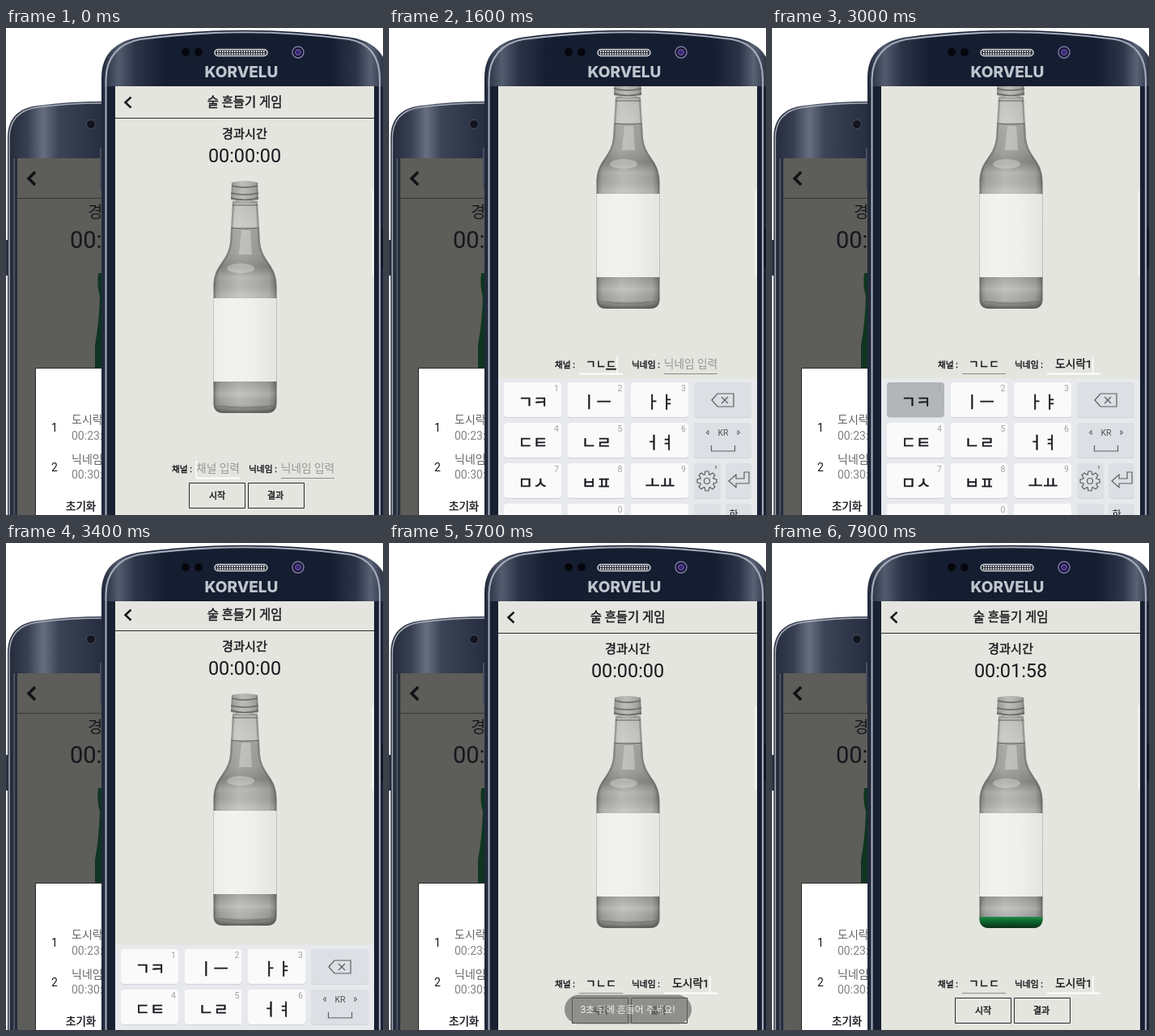
An HTML page that plays this animation: 466 px wide and 602 px high, repeating every 8000 ms.

```html
<!DOCTYPE html>
<html lang="ko">
<head>
<meta charset="utf-8">
<style>
html, body { margin: 0; width: 100%; height: 100%; overflow: hidden; background: #fff }
svg { display: block }
text { font-family: Roboto, "Noto Sans CJK KR", "Noto Sans CJK", sans-serif; fill: #16181d }
.mid { text-anchor: middle }
.med { stroke: #16181d; stroke-width: .4px }
.hint { fill: #969793; stroke: none }
.name { fill: #626468 }
.time { fill: #828386 }
.line { fill: none; stroke: #5b5e63 }
</style>
</head>
<body>
<svg width="466" height="602" viewBox="0 0 466 602">
  <defs>
    <linearGradient id="glass">
      <stop offset="0" stop-color="#1f2738"/><stop offset=".06" stop-color="#535c6f"/>
      <stop offset=".12" stop-color="#2c3548"/><stop offset=".22" stop-color="#151d31"/>
      <stop offset=".8" stop-color="#151d31"/><stop offset=".89" stop-color="#2c3548"/>
      <stop offset=".94" stop-color="#596275"/><stop offset="1" stop-color="#1f2738"/>
    </linearGradient>
    <linearGradient id="rearGlass">
      <stop offset="0" stop-color="#232b3b"/><stop offset=".18" stop-color="#373f51"/>
      <stop offset=".32" stop-color="#666e80"/><stop offset=".46" stop-color="#3b4356"/>
      <stop offset="1" stop-color="#1d2537"/>
    </linearGradient>
    <linearGradient id="grey">
      <stop offset="0" stop-color="#7d7d7b"/><stop offset=".1" stop-color="#a2a29f"/>
      <stop offset=".4" stop-color="#bcbcb9"/><stop offset=".6" stop-color="#b4b4b1"/>
      <stop offset=".88" stop-color="#a0a09d"/><stop offset="1" stop-color="#747472"/>
    </linearGradient>
    <linearGradient id="label">
      <stop offset="0" stop-color="#ededea"/><stop offset=".3" stop-color="#f2f2ef"/>
      <stop offset=".65" stop-color="#eeeeeb"/><stop offset="1" stop-color="#e5e4e0"/>
    </linearGradient>
    <linearGradient id="green" x2="0" y2="1">
      <stop offset="0" stop-color="#2c8a4c"/><stop offset=".35" stop-color="#0c6a30"/>
      <stop offset="1" stop-color="#0a2f19"/>
    </linearGradient>
    <linearGradient id="shade" x2="0" y2="1">
      <stop offset="0" stop-color="#fff" stop-opacity=".1"/><stop offset=".12" stop-color="#fff" stop-opacity=".25"/>
      <stop offset=".14" stop-opacity=".1"/><stop offset=".25" stop-opacity=".12"/>
      <stop offset=".31" stop-opacity=".22"/><stop offset=".36" stop-opacity="0"/>
      <stop offset=".44" stop-color="#fff" stop-opacity=".15"/><stop offset=".85" stop-opacity=".1"/>
      <stop offset=".91" stop-color="#fff" stop-opacity=".12"/><stop offset=".96" stop-opacity=".05"/>
      <stop offset="1" stop-opacity=".45"/>
    </linearGradient>
    <path id="glassBottle" d="M280 214H311L314 265C317 290 334.500 292 334.500 320V464Q334.500 476 322 476H269Q256.500 476 256.500 464V320C256.500 292 274 290 277 265Z"/>
    <clipPath id="inBottle"><use href="#glassBottle"/></clipPath>
    <clipPath id="screen"><path d="M135 72H455V602H135Z"/></clipPath>
  </defs>

  <!-- rear phone -->
  <path d="M0 262h3v44H0z" fill="#2b3242"/>
  <path d="M2 610V136C2 111 16 99 38 96Q85 90 140 91V610Z" fill="url(#rearGlass)"/>
  <path d="M4 610V137C4 113 17 101 39 98Q85 92 140 93" fill="none" stroke="#a9aeb8" stroke-width="1.500"/>
  <path d="M5 160h9v450H5z" fill="#262e3e"/>
  <path d="M10 161V602" stroke="#6f7685"/>
  <circle cx="105" cy="119" r="5.500" fill="#12151f" stroke="#4a4f5c"/>
  <path d="M14 161H120V602H14Z" fill="#5d5d59"/>
  <path d="M14 210.500H120" stroke="#35363a"/>
  <path d="M36 178l-8 8 8 8" fill="none" stroke="#101216" stroke-width="3.500"/>
  <text x="101" y="235" font-size="20">경</text>
  <text x="79" y="272" font-size="29">00:00:00</text>
  <path d="M120 303H114Q112 318 116 332Q115 365 110 392V422H120Z" fill="#0f3522"/>
  <path d="M36 420H120V610H36Z" fill="#2b2b29"/>
  <path d="M37 421H120V610H37Z" fill="#fff"/>
  <g font-size="14">
    <text x="56" y="499">1</text><text x="56" y="548">2</text>
    <text class="name" x="81" y="489">도시락</text><text class="time" x="81" y="509">00:23:10</text>
    <text class="name" x="81" y="538">닉네임</text><text class="time" x="81" y="557">00:30:42</text>
    <text class="med" x="74" y="596" font-size="13.500">초기화</text>
  </g>

  <!-- front phone -->
  <path d="M116 148h4v52h-4z" fill="#474f60"/>
  <path d="M118 610V61C118 32 136 16 165 11.500Q295 -6 425 11.500C456 16 472 34 472 61V610Z" fill="url(#glass)"/>
  <path d="M121 72h14v538h-14zM455 72h12v538h-12z" fill="#182032"/>
  <path d="M123.500 610V64C123.500 36 140 18.500 166 14Q295 -3.500 424 14C450 18.500 462 36 462 64V610" fill="none" stroke="#a4abb8" stroke-width="2.200"/>
  <path d="M464 248h2v47h-2z" fill="#0d1222"/>
  <g fill="#05070d"><circle cx="222" cy="30" r="5"/><circle cx="238" cy="30" r="5"/></g>
  <rect x="258" y="26.500" width="65" height="8" rx="4" fill="#30343e" stroke="#d4d6da" stroke-width="1.500"/>
  <path d="M261 29H321M261 32H321" stroke="#eceded" stroke-width="2" stroke-dasharray="1.500 1.500"/>
  <circle cx="361" cy="30" r="7" fill="#14142c" stroke="#7d7aa6" stroke-width="1.500"/>
  <circle cx="361" cy="30" r="3.500" fill="#352a7a" stroke="#8a62b8"/>
  <text class="mid" x="291" y="60.500" font-size="19" font-weight="800" style="font-family:Inter,sans-serif;fill:#bfc5cd">KORVELU</text>

  <g clip-path="url(#screen)">
    <path d="M135 72H455V602H135Z" fill="#e4e5de"/>
    <g id="page">
      <path d="M154.500 85.500l-7 6.500 7 6.500" fill="none" stroke="#16181d" stroke-width="2.500"/>
      <text class="mid med" x="295" y="97" font-size="15.400">술 흔들기 게임</text>
      <path d="M135 111.500H455" stroke="#2a2d34"/>
      <text class="mid med" x="295" y="135.500" font-size="15.200">경과시간</text>
      <text class="mid" id="clock" x="295" y="166" font-size="23.400"></text>

      <use href="#glassBottle" fill="url(#grey)"/>
      <use href="#glassBottle" fill="url(#shade)"/>
      <g clip-path="url(#inBottle)">
        <use href="#glassBottle" fill="none" stroke="#5f5f5d" stroke-width="5" opacity=".4"/>
        <path d="M278 219H314M278 247Q295 249 314 247" fill="none" stroke="#60605e" stroke-width="1.200"/>
        <g fill="#e6e6e2" opacity=".4">
          <path d="M291 250H302L304 280H288Z"/>
          <ellipse cx="290" cy="297" rx="17" ry="6"/>
        </g>
        <path d="M262 467Q295 472 330 467" fill="none" stroke="#666664" stroke-width="1.500" opacity=".5"/>
        <rect id="fill" x="256" width="79" fill="url(#green)"/>
        <path d="M256 334H335V437H256Z" fill="url(#label)"/>
      </g>
      <path d="M279 191Q295 187 311 191L312 212Q295 219 278 212Z" fill="url(#grey)"/>
      <path d="M279 195Q295 199 311 195M278 204Q295 208 312 204M278 210Q295 215 312 210" fill="none" stroke="#666664" stroke-width="1.500"/>

      <g class="med" font-size="10.700">
        <text x="205" y="549">채널 :</text><text x="300" y="549">닉네임 :</text>
      </g>
      <g id="fields" class="mid" font-size="13.700"></g>
      <path id="caret" stroke="#fff" stroke-width="1.500"/>
      <path d="M226.500 562.500h69v31h-69zM299.500 562.500h69v31h-69z" fill="none" stroke="#292c34"/>
      <g class="mid med" font-size="11"><text x="261" y="582">시작</text><text x="333" y="582">결과</text></g>
    </g>
    <g id="toast">
      <rect x="217" y="558.500" width="157" height="36" rx="18" fill="#6c6c69" fill-opacity=".94"/>
      <text class="mid" x="295" y="581" font-size="11.900" style="fill:#f4f4f2">3초 뒤에 흔들어 주세요!</text>
    </g>
    <g id="keyboard"><path d="M135 433H455V660H135Z" fill="#e7e9ec"/></g>
  </g>
  <path d="M453.500 201V305" stroke="#f5f5f3" stroke-width="2"/>
</svg>
<script>
const $ = id => document.getElementById(id);
const clamp = v => Math.max(0, Math.min(1, v));
const ease = v => 1 - (1 - clamp(v)) ** 3;
const pad = n => String(Math.floor(n)).padStart(2, '0');

// Keyboard
const labels = ['ㄱㅋ', 'ㅣㅡ', 'ㅏㅑ', 'ㄷㅌ', 'ㄴㄹ', 'ㅓㅕ', 'ㅁㅅ', 'ㅂㅍ', 'ㅗㅛ', '', 'ㅇㅎ', ''];
const cap = (x, y, w, color, attr = '') =>
  `<rect x="${x}" y="${y + 1}" width="${w}" height="43" rx="4" fill="#cfd2d7"/>
   <rect ${attr} x="${x}" y="${y}" width="${w}" height="43" rx="4" fill="${color}"/>`;
let keys = '';
labels.forEach((label, i) => {
  const x = 142 + i % 3 * 78.5, y = 438 + Math.floor(i / 3) * 50;
  const digit = i < 9 ? i + 1 : i === 10 ? 0 : '';
  keys += cap(x, y, 71, '#fafafa', 'class="key"') +
    `<text class="mid med" x="${x + 36}" y="${y + 32}" font-size="20">${label}</text>
     <text x="${x + 62}" y="${y + 11}" font-size="10.500" style="fill:#a0a3a7">${digit}</text>`;
});
const side = '#dcdfe3';
keys += cap(377, 438, 71, side) + cap(377, 488, 71, side);
for (const y of [538, 588]) keys += cap(377, y, 33, side) + cap(416.5, y, 31.5, side);
const teeth = [...Array(8)].map((_, i) =>
  `<path d="M390 552.500l1-4.500h4l1 4.500" transform="rotate(${i * 45} 393 560)"/>`).join('');
keys += `<g class="line" stroke-width="1.200">
  <path d="M399 460l7-8h20v16h-20zM411 456l8 8m0-8l-8 8"/>
  <path d="M398.500 516v7h29v-7"/>
  ${teeth}<circle cx="393" cy="560" r="3.500"/>
  <path d="M445 549v14h-16v5l-9-8 9-8v5h10v-8z"/></g>
  <path d="M395 497.500v5l-3-2.500zM431 497.500v5l3-2.500z" class="line"/>
  <path d="M404 541v4" stroke="#999" stroke-width="2"/>
  <text class="mid" x="413" y="504" font-size="10.500" style="fill:#505358">KR</text>
  <text class="mid" x="426" y="606" font-size="12">한</text>`;
$('keyboard').innerHTML += keys;
const keyTops = document.querySelectorAll('.key');

// Input fields
const inputs = [
  { hint: '채널 입력', x: 235, w: 54 },
  { hint: '닉네임 입력', x: 340, w: 66 }
];
for (const f of inputs) {
  $('fields').innerHTML += `<path d="M${f.x} 556.500h${f.w}"/><text x="${f.x + f.w / 2}" y="549"></text>`;
}
inputs.forEach((f, i) => [f.line, f.text] = [...$('fields').children].slice(i * 2, i * 2 + 2));

// time, key, field, text
const strokes = [
  [700, 0, 0, 'ㄱ'], [1100, 4, 0, 'ㄱㄴ'], [1500, 3, 0, 'ㄱㄴㄷ'],
  [2000, 3, 1, 'ㄷ'], [2100, 8, 1, '도'], [2300, 6, 1, '돔'], [2400, 6, 1, '돗'],
  [2500, 1, 1, '도시'], [2600, 4, 1, '도신'], [2700, 4, 1, '도실'],
  [2800, 2, 1, '도시라'], [2900, 0, 1, '도시락'], [3000, 0, 1, '도시락1']
];

function drawFields(t) {
  const focus = t < 1900 ? 0 : 1;
  const typed = ['', ''];
  for (const [at, , field, text] of strokes) if (t >= at) typed[field] = text;
  inputs.forEach((f, i) => {
    const s = typed[i], active = i === focus;
    f.text.setAttribute('class', s ? 'med' : 'hint');
    f.text.innerHTML = active && s && t < 3000
      ? `${s.slice(0, -1)}<tspan text-decoration="underline">${s.slice(-1)}</tspan>` : s || f.hint;
    f.line.setAttribute('stroke', active ? '#fff' : '#8b8c89');
    f.line.setAttribute('stroke-width', active ? 2 : 1);
    if (active) {
      const x = s ? f.x + f.w / 2 + f.text.getComputedTextLength() / 2 + 1 : f.x;
      $('caret').setAttribute('d', `M${x} 535V556`);
    }
  });
}

const shift = (id, y) => $(id).setAttribute('transform', `translate(0 ${Math.round(y)})`);

function draw(t) {
  const rise = ease((t - 200) / 400);
  const drop = Math.max(0, t - 3300) / 100;
  shift('page', -129 * (drop ? Math.max(0, 1 - drop * .973) : rise));
  shift('keyboard', 200 * (1 - rise) + 64 * drop ** 1.5);
  keyTops.forEach((k, i) => k.setAttribute('fill',
    strokes.some(([at, key]) => key === i && t >= at && t < at + 100) ? '#b3b6b9' : '#fafafa'));
  drawFields(t);

  $('toast').setAttribute('opacity', clamp((t - 3700) / 200) * clamp((6000 - t) / 400));

  const run = Math.max(0, t - 6320);
  $('clock').textContent = `00:${pad(run / 1000)}:${pad(run % 1000 / 10)}`;
  const h = 14 * run / 1580;
  $('fill').setAttribute('y', 476 - h);
  $('fill').setAttribute('height', h);
}

function tick(now) {
  draw(Math.floor(now % 8000 / 100) * 100);
  requestAnimationFrame(tick);
}
tick(performance.now());
</script>
</body>
</html>
```
